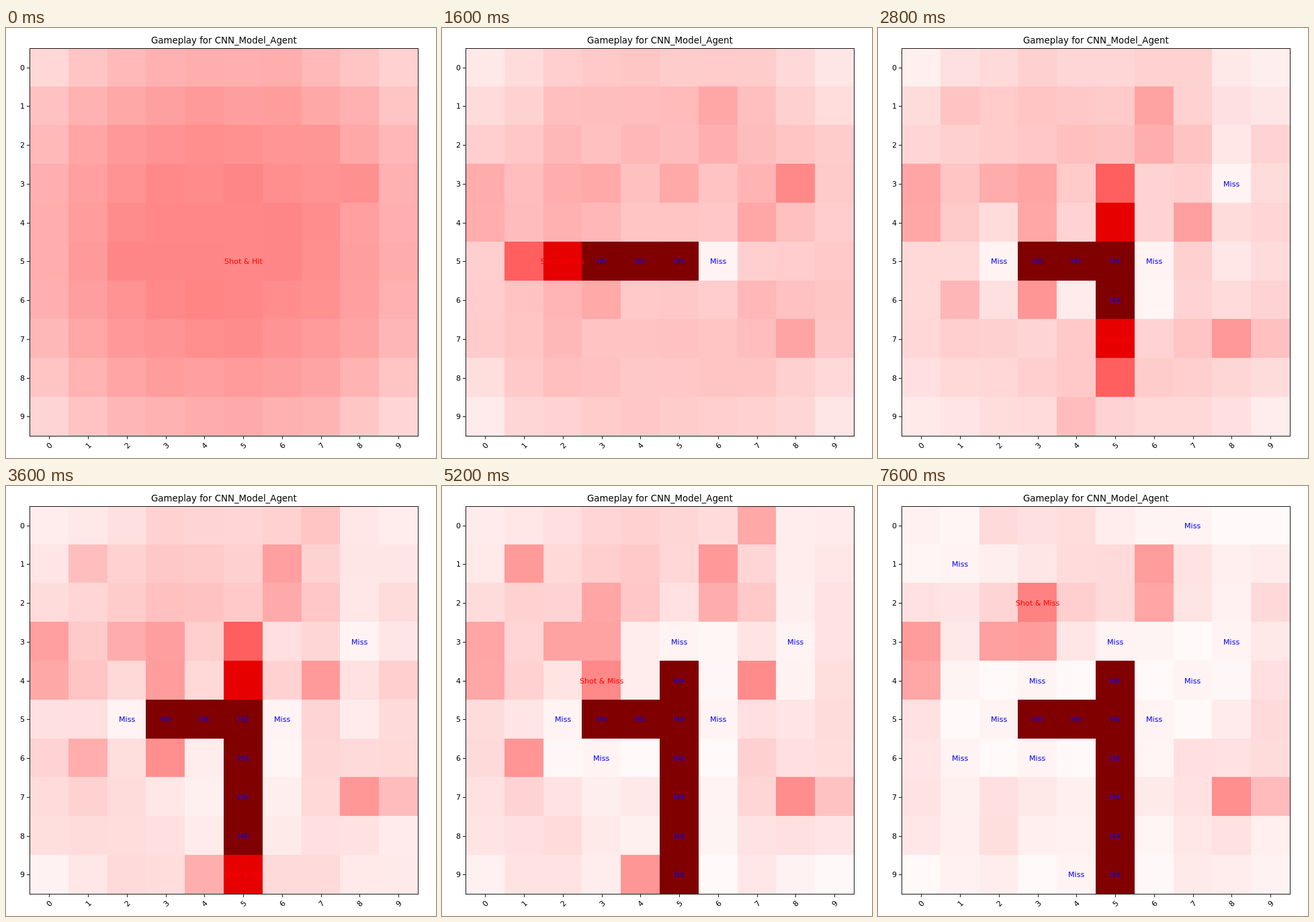
Recreate the animation shown at these times as an HTML page. Size 640x640 px, loop 8 s.

```html
<!DOCTYPE html>
<html lang="en">
<head>
<meta charset="utf-8">
<title>Gameplay heatmap</title>
<style>
html, body { margin: 0; width: 100%; height: 100%; overflow: hidden; background: #fff; }
svg { display: block; width: 100%; height: 100%; font: 11.11px "DejaVu Sans", sans-serif; }
rect, line { shape-rendering: crispEdges; }
.axis { fill: none; stroke: #000; stroke-opacity: .89; }
</style>
</head>
<body>
<svg id="stage" viewBox="0 0 640 640"></svg>
<script>
const N = 10, STEP = 400, CELL = 57.8, LEFT = 35.45, TOP = 29.3;
const SHIPS = [5, 4, 3, 3, 2];
const HIT_HEAT = 382, MISS_HEAT = 12; // 0 white, 255 red, 382 dark red
const stage = document.getElementById('stage');

// The game, one shot per step
const shots = [
  [5, 5, 'Hit'], [5, 4, 'Hit'], [5, 6, 'Miss'], [5, 3, 'Hit'], [5, 2, 'Miss'],
  [3, 8, 'Miss'], [6, 5, 'Hit'], [7, 5, 'Hit'], [8, 5, 'Hit'], [9, 5, 'Hit'],
  [6, 3, 'Miss'], [4, 5, 'Hit'], [3, 5, 'Miss'], [4, 3, 'Miss'], [4, 7, 'Miss'],
  [9, 4, 'Miss'], [6, 1, 'Miss'], [1, 1, 'Miss'], [0, 7, 'Miss'], [2, 3, 'Miss']
].map(([row, col, result]) => ({ row, col, result }));

// Cells the agent keeps favouring: row, column, heat
const favourites = [
  [3, 0, 98], [4, 0, 95], [1, 6, 100], [2, 6, 90],
  [3, 2, 92], [3, 3, 100], [7, 8, 115], [7, 9, 65]
];

const dirs = [[0, 1], [0, -1], [1, 0], [-1, 0]];
const mix = (a, b, p) => a + (b - a) * p;
const inside = (r, c) => r >= 0 && r < N && c >= 0 && c < N;
const shotAt = (r, c) => shots.findIndex(s => s.row === r && s.col === c);

// Result already known at this step, or ''
function known(r, c, step) {
  const s = shotAt(r, c);
  return s >= 0 && s < step ? shots[s].result : '';
}

function freeRun(r, c, [dr, dc], step) {
  let n = 0;
  while (inside(r += dr, c += dc) && !known(r, c, step)) n++;
  return n;
}

// Number of ship placements that still fit over a cell
function placements(r, c, step) {
  const [right, left, down, up] = dirs.map(d => freeRun(r, c, d, step));
  const fits = (a, b, len) => Math.max(0, Math.min(a, len - 1) + Math.min(b, len - 1) - len + 2);
  return SHIPS.reduce((sum, len) => sum + fits(left, right, len) + fits(up, down, len), 0);
}

// Cells in line with two or more hits glow
function lineHeat(r, c, step) {
  return Math.max(...dirs.map(d => {
    const gap = freeRun(r, c, d, step) + 1;
    const isHit = n => known(r + d[0] * n, c + d[1] * n, step) === 'Hit';
    return gap <= 2 && isHit(gap) && isHit(gap + 1) ? 400 - 120 * gap : 0;
  }));
}

function noise(r, c, step) {
  const v = Math.sin(r * 12.9898 + c * 78.233 + step * 37.719) * 43758.5453;
  return (v - Math.floor(v)) * 2 - 1;
}

function heatAt(r, c, step) {
  const result = known(r, c, step);
  if (result) return result === 'Hit' ? HIT_HEAT : MISS_HEAT;

  const early = Math.exp(-step / 4);
  let heat = mix(2.1, 3.3, early) * placements(r, c, step) + mix(-8, 10, early);
  const liked = favourites.find(f => f[0] === r && f[1] === c);
  if (liked) heat = mix(liked[2], heat, early);

  // Interest builds up towards the coming shot
  const s = shotAt(r, c);
  if (s >= 0 && shots[s].result === 'Miss') {
    heat = mix(heat, 125, Math.max(0, 1 - (s - step) / 12));
  }
  heat += noise(r, c, step) * mix(6, 3, early);
  return Math.max(6, heat, lineHeat(r, c, step));
}

function colour(heat) {
  const fade = Math.round(Math.max(0, 255 - heat));
  return `rgb(${Math.round(Math.min(255, 510 - heat))},${fade},${fade})`;
}

function add(tag, attrs = {}) {
  const el = document.createElementNS('http://www.w3.org/2000/svg', tag);
  for (const name in attrs) el.setAttribute(name, attrs[name]);
  return stage.appendChild(el);
}

// Text starts on a whole pixel; align 0.5 centres it, 1 ends it at x
function write(el, text, x, y, align = 0.5) {
  el.textContent = text;
  el.setAttribute('x', Math.round(x - el.getComputedTextLength() * align));
  el.setAttribute('y', y);
}

const edgeX = c => Math.floor(LEFT + CELL * c);
const edgeY = r => Math.floor(TOP + CELL * r);
const midX = c => 64.3 + 57.75 * c;
const midY = r => Math.round(58.5 + 57.75 * r);

const cells = [];
for (let r = 0; r < N; r++) {
  for (let c = 0; c < N; c++) {
    const x = edgeX(c), y = edgeY(r);
    const rect = add('rect', { x, y, width: edgeX(c + 1) - x, height: edgeY(r + 1) - y });
    cells.push({ r, c, rect });
  }
}
add('rect', { x: 30, y: 28, width: 590, height: 2, fill: '#fff' });
add('rect', { x: 35.5, y: 30.5, width: 578, height: 577, class: 'axis' });
write(add('text', { 'font-size': 13.33 }), 'Gameplay for CNN_Model_Agent', 324.5, 23);

for (let i = 0; i < N; i++) {
  const x = Math.round(midX(i)) + 0.5, y = midY(i) + 0.5;
  add('line', { x1: 31, x2: 35, y1: y, y2: y, class: 'axis' });
  add('line', { x1: x, x2: x, y1: 608, y2: 612, class: 'axis' });
  write(add('text'), i, 27.7, midY(i) + 4, 1);
  const tick = add('text', { y: 4, 'text-anchor': 'middle', transform: `translate(${x} 621.5) rotate(-45)` });
  tick.textContent = i;
}
const labels = shots.map(() => add('text'));

function show(step) {
  cells.forEach(({ r, c, rect }) => rect.setAttribute('fill', colour(heatAt(r, c, step))));
  shots.forEach(({ row, col, result }, i) => {
    const now = i === step;
    const text = i > step ? '' : (now ? 'Shot & ' : '') + result;
    labels[i].setAttribute('fill', now ? '#f00' : '#00f');
    write(labels[i], text, midX(col), midY(row) + 4);
  });
}

const start = performance.now();
let shown = -1;
function tick() {
  const step = Math.floor((performance.now() - start) / STEP) % shots.length;
  if (step !== shown) show(shown = step);
  requestAnimationFrame(tick);
}
tick();
</script>
</body>
</html>
```
